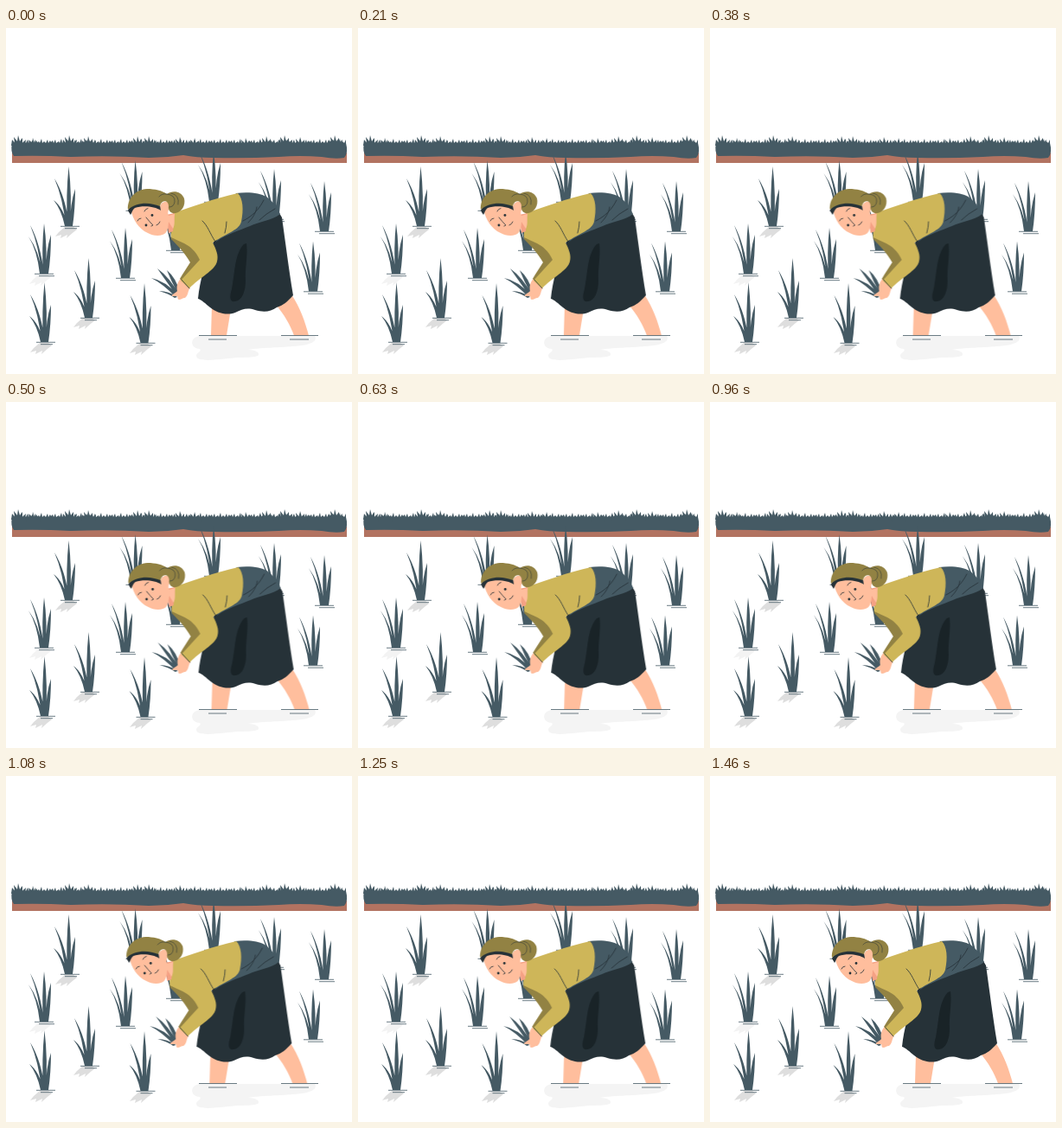
An HTML page without scripts for the animation above (1500 ms loop, 400 px wide and 400 px high).

```html
<!DOCTYPE html>
<html lang="en">
<head>
<meta charset="utf-8">
<title>Planting rice</title>
<style>
  html, body { margin: 0; width: 100%; height: 100%; overflow: hidden; background: #fff; }
  svg { display: block; width: 100vw; height: 100vh; }
  .slate { fill: #455a64; }
  .dark { fill: #263238; }
  .skin { fill: #ffbe9d; }
  .cloth { fill: #ceb659; }
  .scarf { fill: #928243; }
  .line { fill: none; stroke: #263238; stroke-width: .8; stroke-linecap: round; }
  .ripple { fill: none; stroke: #455a64; stroke-width: .8; }
  .farmer { animation: shake 1.5s infinite; }
  @keyframes shake {
    10%, 90% { transform: translateX(-.8px); }
    20%, 80% { transform: translateX(1.6px); }
    30%, 50%, 70% { transform: translateX(-3.2px); }
    40%, 60% { transform: translateX(3.2px); }
  }
</style>
</head>
<body>
<svg viewBox="0 0 400 400" role="img" aria-label="A farmer planting rice">
  <defs>
    <g id="tall">
      <path class="slate" d="M-4 0Q-8-19-17-30Q-5-21-1 0ZM-3 0Q-6-32-16-55Q-3-34 1 0ZM-1 0Q-3-35 0.500-69Q4.500-35 2 0ZM2 0Q2-26 8-43Q8-20 5 0Z"/>
      <path class="ripple" d="M-9 .3H13M-4 2.700H10"/>
    </g>
    <g id="short">
      <path class="slate" d="M-4 0Q-7-27-17-43Q-5-27-1 0ZM-2 0Q-5-32-15-56Q-3-34 1 0ZM0 0Q-2-30 1-58Q5-30 3 0ZM3 0Q3-27 9-45Q9-20 6 0Z"/>
      <path class="ripple" d="M-10 .3H12M-5 2.700H13"/>
    </g>
    <path id="shade" d="M-6 0L-13 6L-17 11L-10 9L-11 13L-3 9L-4 13L4 6L8 3L4 0Z"/>
    <path id="tuft" class="slate" d="M-8 11L-7 4L-4 8L-5 1L-1 6L0-1L2 6L5 2L5 8L9 4L8 11Z"/>
    <pattern id="blades" x="6" y="127" width="23" height="9" patternUnits="userSpaceOnUse">
      <path class="slate" d="M0 9V5L2 3L3 6L5 2L6 6L9 4L10 6L12 1L13 6L15 4L17 6L19 2L20 6L22 3L23 5V9Z"/>
    </pattern>
  </defs>

  <rect width="400" height="400" fill="#fff"/>

  <g id="bank">
    <path fill="#b27361" d="M7 144H394V156H7Z"/>
    <path class="slate" d="M7 133H393Q396 144 391 150Q381 152 365 149Q340 147 315 149Q275 151 240 150Q220 150 205 147Q185 150 165 150Q120 147 75 149Q40 147 9 148Q5 143 7 133Z"/>
    <rect x="7" y="127" width="386" height="9" fill="url(#blades)"/>
    <use href="#tuft" x="14" y="125"/>
    <use href="#tuft" x="31" y="128"/>
    <use href="#tuft" x="73" y="125"/>
    <use href="#tuft" x="95" y="126"/>
    <use href="#tuft" x="152" y="126"/>
    <use href="#tuft" x="165" y="126"/>
    <use href="#tuft" x="201" y="127"/>
    <use href="#tuft" x="218" y="128"/>
    <use href="#tuft" x="277" y="128"/>
    <use href="#tuft" x="301" y="126"/>
    <use href="#tuft" x="322" y="125"/>
    <use href="#tuft" x="340" y="127"/>
    <use href="#tuft" x="380" y="125"/>
  </g>

  <g id="shadows" fill="#dedede">
    <use href="#shade" x="74" y="230"/>
    <use href="#shade" x="44" y="285" fill="#f3f3f3"/>
    <use href="#shade" x="45" y="364"/>
    <use href="#shade" x="95" y="335"/>
    <use href="#shade" x="160" y="365"/>
    <path fill="#f4f4f4" d="M223 356H357C361 363 350 367 332 368C314 370 294 369 280 372C288 372 293 375 292 378C288 382 272 380 257 382C239 384 220 386 220 379C220 375 227 374 224 371C214 371 211 359 223 356Z"/>
  </g>

  <g id="plants">
    <use href="#tall" x="72" y="229"/>
    <use href="#tall" x="44" y="363"/>
    <use href="#tall" x="95" y="335"/>
    <use href="#tall" x="159.500" y="364"/>
    <use href="#short" x="43" y="284"/>
    <use href="#short" x="137" y="289"/>
    <use href="#short" x="367" y="235"/>
    <use href="#short" x="354" y="304.500"/>
    <use href="#short" x="148.500" y="211"/>
    <use href="#short" x="239" y="201"/>
    <use href="#short" x="309" y="221"/>
    <use href="#short" x="195" y="257"/>
  </g>

  <g class="farmer">
    <path class="skin" d="M238 322L237 355.500H255L260 325ZM312 320C321 330 329 344 333 355.500H350C346 340 340 323 330 308Z"/>
    <path class="dark" d="M240 247C255 233 282 222 313 209L319 219C323 247 327 279 332 309C326 316 320 321 313 323C306 328 298 329 288 326C279 323 273 325 265 329C255 333 243 329 236 323C231 319 226 314 222 313C224 293 230 270 240 247Z"/>
    <path fill="#192327" d="M278 249C280 262 276 278 277 292C277 304 273 315 265 316C259 317 258 312 261 302C265 282 264 262 275 250Z"/>
    <path class="slate" d="M266 191C281 189 294 191 301 195C308 200 313 206 317 215C309 222 292 224 282 229C270 234 256 238 243 247Z"/>
    <path class="line" d="M298 199C292 211 284 218 274 223M290 207C289 214 285 220 280 225M311 209Q300 215 293 222"/>

    <g id="seedlings">
      <path class="slate" d="M200 308Q189 288 175 278Q184 291 197 309ZM199 309Q184 292 168 289Q182 296 196 311ZM201 306Q197 289 186 280Q191 293 199 307ZM198 311Q188 304 177 304Q188 307 195 312Z"/>
    </g>
    <path class="skin" d="M203 289L213 300C210 304 211 309 207 312C204 312 203 314 200 314C198 314 199 311 198 310L192 310C191 308 197 306 198 304C197 299 198 293 203 289Z"/>
    <path class="scarf" d="M191 239L213 245L226 267L206 294L201 290C205 283 210 276 213 271C207 260 198 251 191 244Z"/>
    <path class="cloth" d="M193 214C215 207 240 197 268 191C274 197 275 210 272 224C270 233 258 236 239 248C243 256 246 263 244 270C242 280 223 289 212 301L202 292L224 268C219 257 213 253 206 249C200 246 195 244 191 242C190 234 195 226 193 214Z"/>
    <path class="line" d="M227 223C233 228 236 238 242 247M255 224Q255 230 253 237M203 291L212 301"/>

    <path fill="#f5a184" d="M185 216L195 214L193 235L188 237Z"/>
    <path class="skin" d="M144 209C153 203 168 202 178 207C179 200 188 198 189 205C189 209 186 213 188 217L195 215C194 221 196 227 193 232L188 224C188 231 186 238 181 239C176 241 169 240 164 237C153 232 147 222 144 209Z"/>
    <path class="dark" d="M141 211C147 200 164 197 178 205L179 211C172 206 158 205 149 208C146 210 145 215 144 216Z"/>
    <path class="scarf" d="M141 210C140 198 149 187 163 186C172 186 181 188 186 192C193 187 203 189 206 197C208 205 203 213 196 214C191 215 187 211 188 206C188 199 180 198 178 206C166 201 151 201 141 210Z"/>
    <path class="line" stroke-opacity=".65" d="M186 192Q180 191 177 195M186 192Q196 193 195 201Q194 207 189 207M191 191Q201 193 199 204"/>
    <path class="line" stroke-width="1.100" d="M152 223Q153 220 156 220M160 212Q161 209 164 208.500"/>
    <path class="line" d="M162 219Q166 224 170 228L168 229M174 228Q177 227 178 224"/>
    <circle class="dark" cx="162" cy="228" r="1.400"/>
    <circle class="dark" cx="169" cy="216.500" r="1.400"/>
  </g>

  <path class="ripple" d="M223 355.500H267M234 360H255M318 355.500H361M328 360H350"/>
</svg>
</body>
</html>
```
